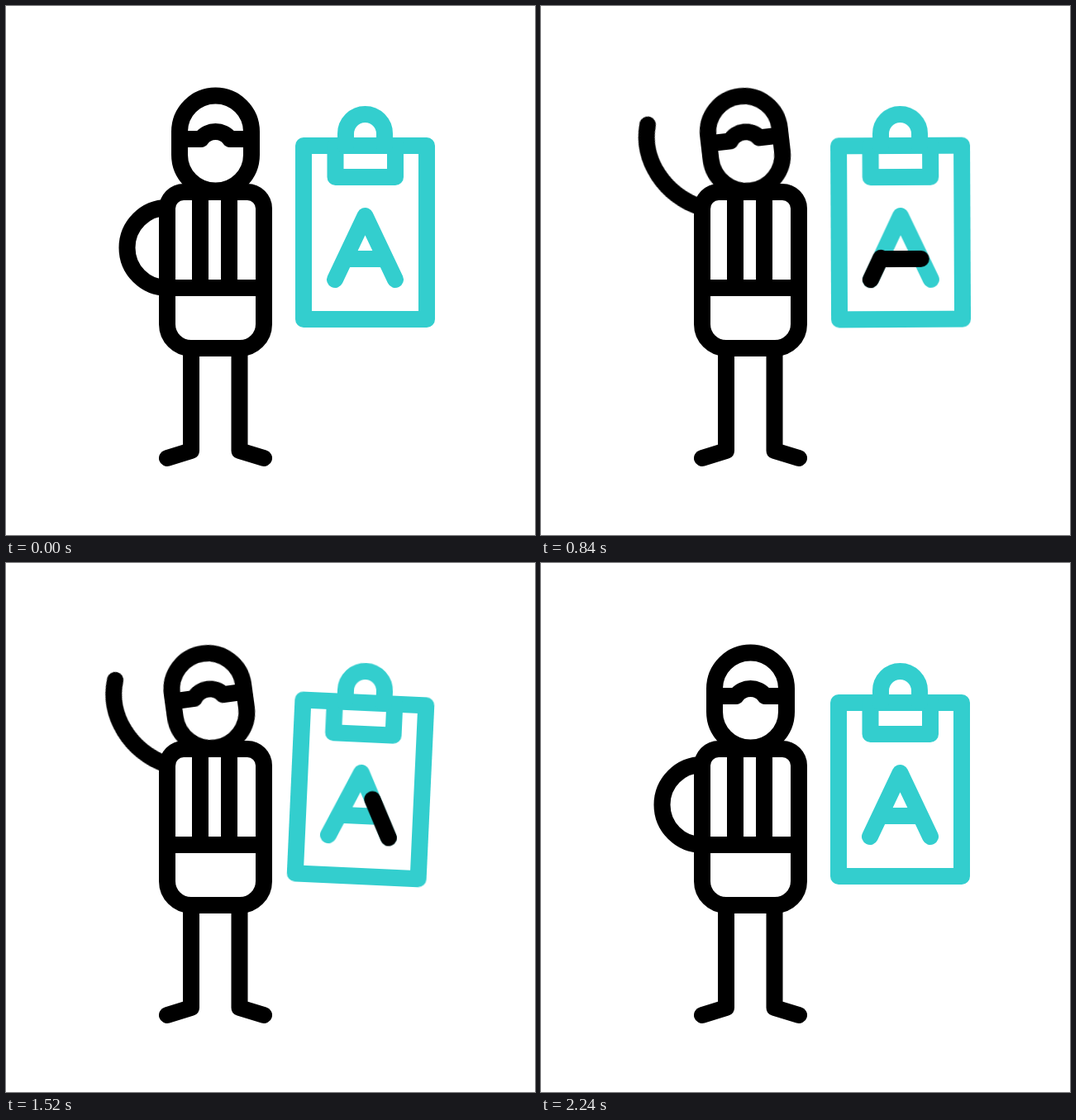
An HTML page that plays this animation: 640 px wide and 640 px high, repeating every 2.4 s.

```html
<!DOCTYPE html>
<html lang="en">
<head>
<meta charset="utf-8">
<title>Referee with clipboard</title>
<style>
  @property --from { syntax: "<length>"; inherits: true; initial-value: -1px; }
  @property --to { syntax: "<length>"; inherits: true; initial-value: -1px; }

  html, body { margin: 0; width: 100%; height: 100%; overflow: hidden; background: #fff; }
  svg { display: block; width: 100%; height: 100%; }

  .line { fill: none; stroke: #000; stroke-width: 20; stroke-linecap: round; stroke-linejoin: round; }
  .teal { stroke: #33cece; }

  .head, .arm, .arm path, .board, .ink {
    animation: 2400ms cubic-bezier(.333, 0, .667, 1) infinite;
  }
  .head { transform-origin: 253.5px 222px; animation-name: nod; }
  .arm { transform-origin: 195px 244px; animation-name: wave; }
  .arm path { animation-name: raise; }
  .board { transform-origin: 434.5px 154.5px; animation-name: swing; }

  /* The ink runs along the crossbar first, then up and down the legs. */
  .ink { animation-name: write; }
  .ink path {
    stroke-dasharray: calc(var(--to) - var(--from)) 999px;
    stroke-dashoffset: calc(var(--start) - var(--from));
  }

  @keyframes nod {
    0%, 8.333%, 91.667%, 100% { transform: rotate(0deg); }
    25%, 50%, 75% { transform: rotate(6deg); }
    37.5%, 62.5% { transform: rotate(-8deg); }
  }
  @keyframes wave {
    0%, 25%, 50%, 75%, 100% { transform: rotate(0deg); }
    37.5%, 62.5% { transform: rotate(20deg); }
  }
  @keyframes raise {
    0%, 8.333%, 91.667%, 100% {
      d: path("M195 244 C168.2 244 146.5 265.7 146.5 292.5 C146.5 319.3 168.2 341 195 341");
    }
    25%, 75% {
      d: path("M195 244 C171 244 149 236 132.3 222.6 C115.6 209.2 104.2 190.5 101.3 169");
    }
  }
  @keyframes swing {
    0%, 8.333%, 91.667%, 100% { transform: rotate(0deg); }
    25% { transform: rotate(4.8deg); }
    50% { transform: rotate(-9.5deg); }
    66.667% { transform: rotate(4deg); }
    79.167% { transform: rotate(-2.2deg); }
  }
  @keyframes write {
    0%, 25% { --from: -1px; --to: -1px; }
    50% { --from: -1px; --to: 222px; }
    69.58%, 100% { --from: 222px; --to: 222px; }
  }
</style>
</head>
<body>
<svg viewBox="0 0 640 640">
  <g class="line">
    <g class="arm">
      <path d="M195 244 C168.2 244 146.5 265.7 146.5 292.5 C146.5 319.3 168.2 341 195 341"/>
    </g>
    <g class="head">
      <path d="M210 152 a43.5 43.5 0 0 1 87 0 V180 a43.5 43.5 0 0 1 -87 0 Z"/>
      <path d="M210 161 H236 C240 155 247 152 253.5 152 S267 155 271 161 H297"/>
    </g>
    <path d="M215 225 H292 a20 20 0 0 1 20 20 V385 a29 29 0 0 1 -29 29 H224 a29 29 0 0 1 -29 -29 V245 a20 20 0 0 1 20 -20 Z"/>
    <path d="M195 341 H312 M235 225 V341 M270 225 V341"/>
    <path d="M224 414 V538 L195 547 M282.5 414 V538 L312 547"/>
  </g>
  <g class="board line">
    <g class="teal">
      <path d="M360 169 H509 V379 H360 Z"/>
      <path d="M398.5 169 V207 H471 V169"/>
      <path d="M411 169 V154.5 a23.5 23.5 0 0 1 47 0 V169"/>
      <path d="M410 306 H459 M398 331 L434.5 254 L471 331"/>
    </g>
    <g class="ink">
      <path style="--start: 0px" d="M410 306 H459"/>
      <path style="--start: 49px" d="M398 331 L434.5 254 L471 331"/>
    </g>
  </g>
</svg>
</body>
</html>
```
